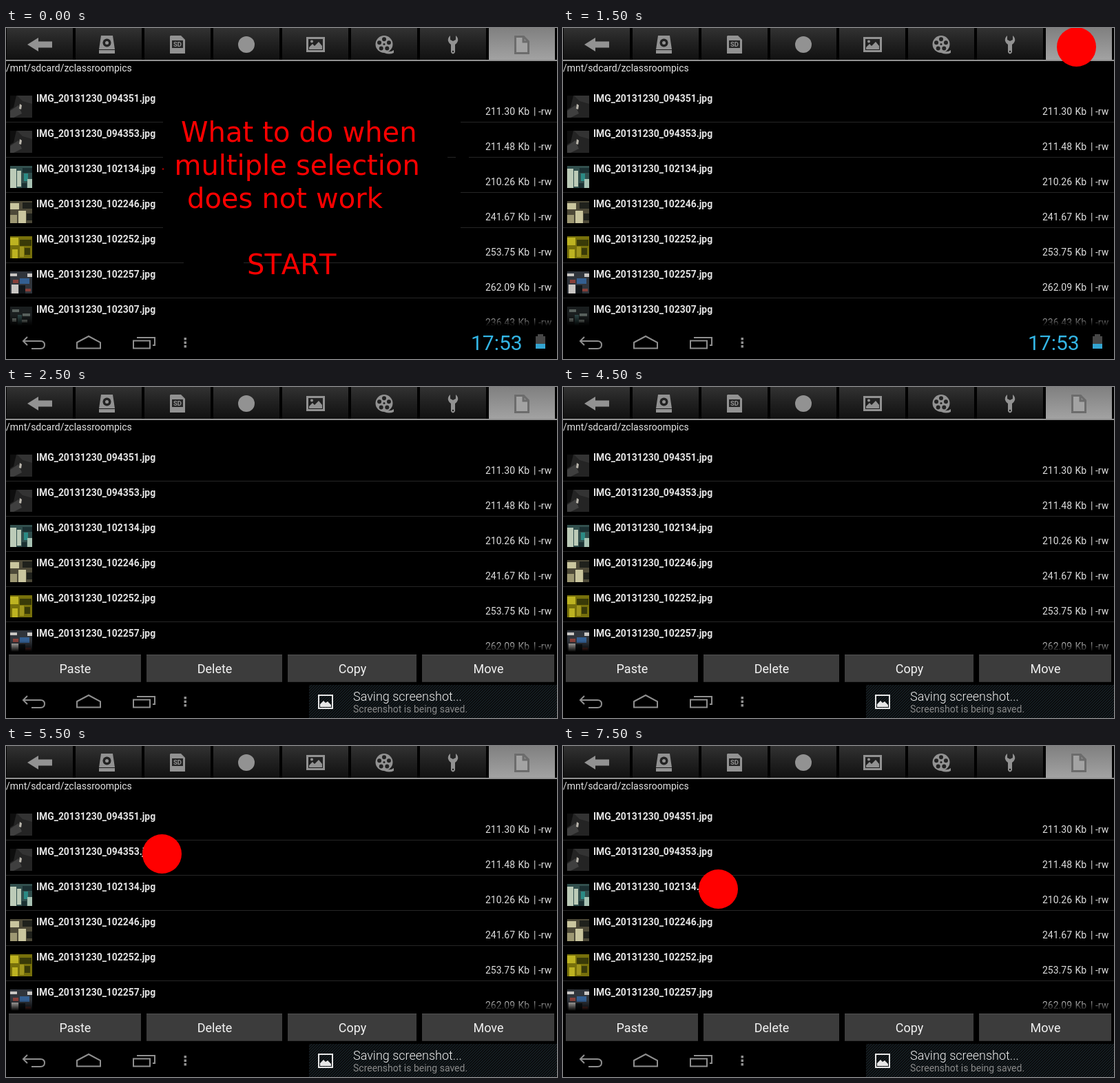
These frames come from a looping animation (800x480 px, 8 s). An HTML page:

```html
<!DOCTYPE html>
<html lang="en">
<head>
<meta charset="utf-8">
<title>Multiple selection</title>
<style>
  html, body { margin: 0; width: 100%; height: 100%; overflow: hidden; background: #000; }
  svg { display: block; width: 800px; height: 480px; font: 14px Roboto, sans-serif; }
  .name { font-size: 13.9px; font-weight: 700; fill: #e4e4e4; }
  .size { fill: #dedede; word-spacing: 1px; }
  .title { font: 40px "DejaVu Sans", sans-serif; font-kerning: none; fill: #f00; word-spacing: .4px; }
  .button { font-size: 18px; fill: #f2f2f2; text-anchor: middle; }
</style>
</head>
<body>
<svg viewBox="0 0 800 480">
  <defs>
    <linearGradient id="tab" x2="0" y2="1">
      <stop stop-color="#323232"/><stop offset=".5" stop-color="#202020"/><stop offset="1" stop-color="#111"/>
    </linearGradient>
    <linearGradient id="active" x2="0" y2="1">
      <stop stop-color="#808080"/><stop offset="1" stop-color="#a2a2a2"/>
    </linearGradient>
    <linearGradient id="fade" x2="0" y2="1">
      <stop stop-opacity="0"/><stop offset="1"/>
    </linearGradient>
    <pattern id="hatch" width="4" height="4" patternUnits="userSpaceOnUse">
      <rect width="4" height="4" fill="#0b0d0e"/>
      <path d="M-1 1L1 -1M0 4L4 0M3 5L5 3" stroke="#20303a" stroke-width=".8"/>
    </pattern>
  </defs>
  <rect width="800" height="480"/>

  <g id="tabs"></g>
  <rect y="46" width="800" height="2" fill="#929292"/>
  <g fill="#929292">
    <path d="M31 24L47 14V19.500H67V28.500H47V34Z"/>
    <path d="M138 11H155L158 31H135ZM135 32H158V37H135Z"/>
    <circle cx="146.500" cy="21.500" r="6" fill="#222"/>
    <circle cx="146.500" cy="21.500" r="2.500"/>
    <path d="M239 11H254L260 17V37H238V12Z"/>
    <rect x="241" y="18" width="16" height="11" fill="#252525"/>
    <text x="249" y="27" font-size="9.500" font-weight="700" text-anchor="middle">SD</text>
    <circle cx="349" cy="24" r="12"/>
    <path fill-rule="evenodd" d="M436 13H463V35H436ZM439 16V32H460V16Z"/>
    <path d="M440 31V28L445 23L448 26L454 20L459 26V31Z"/>
    <circle cx="444" cy="19.500" r="2"/>
    <circle cx="549" cy="23.500" r="12.500"/>
    <path d="M549 33Q558 36 563 32V36Q557 39 549 36Z"/>
    <g id="reel" fill="#222"></g>
    <path d="M645 11V17L649 19L653 17V11Q657 14 656 19Q655 22 652 24V35Q649 40 646 35V24Q643 22 642 19Q641 14 645 11Z"/>
    <circle cx="649" cy="34" r="1.300" fill="#222"/>
  </g>
  <path d="M739.500 12.500H751.500L758.500 19.500V36.500H739.500ZM751 13V20H758" fill="#a3a3a3" stroke="#6c6c6c" stroke-width="3"/>

  <text y="63" fill="#e4e4e4">/mnt/sdcard/zclassroompics</text>
  <g id="rows"></g>
  <rect y="416" width="800" height="16" fill="url(#fade)"/>

  <rect y="432" width="800" height="48"/>
  <g fill="none" stroke="#8f8f8f" stroke-width="2">
    <path d="M31 448L25 454L31 460M25 454H50Q56 454 56 459.500T50 465H37"/>
    <path d="M103 456L120 447L137 456V464.500H103Z"/>
    <path d="M185 453.500H209V464.500H185ZM190 449H216V460H213"/>
  </g>
  <path d="M258.500 449h3.500v3.500h-3.500zM258.500 454.500h3.500v3.500h-3.500zM258.500 460h3.500v3.500h-3.500z" fill="#8f8f8f"/>
  <text x="675" y="467" font-size="30" fill="#33b5e5">17:53</text>
  <path d="M772 444H780V447H783V465H769V447H772Z" fill="#474747"/>
  <rect x="769" y="458" width="14" height="7" fill="#33a5d2"/>

  <g id="title">
    <path d="M228 136.500H660M228 187.500H641M653 187.500H672M228 238.500H660M228 289.500H660M258 340.500H345" stroke="#000" stroke-width="3"/>
    <circle cx="228" cy="204.500" r="1.300" fill="#b00000"/>
    <g class="title">
      <text x="254" y="165">What to do when</text>
      <text x="244.500" y="213">multiple selection</text>
      <text x="263" y="261">does not work</text>
      <text x="350" y="357">START</text>
    </g>
  </g>

  <g id="panel">
    <rect y="368" width="800" height="16" fill="url(#fade)"/>
    <rect y="384" width="800" height="48"/>
    <g id="buttons"></g>
    <rect x="440" y="432" width="360" height="48" fill="url(#hatch)"/>
    <path fill="#e6e6e6" fill-rule="evenodd" d="M453 446H475V467H453ZM455 448V465H473V448Z"/>
    <path fill="#e6e6e6" d="M456 464V460L461 455L464 458L467 456L472 461V464Z"/>
    <text x="504" y="455" font-size="18" font-weight="300" fill="#f0f0f0">Saving screenshot...</text>
    <text x="504" y="472" fill="#8a8a8a">Screenshot is being saved.</text>
  </g>
  <circle id="dot" r="28.500" fill="#f00"/>
</svg>
<script>
const $ = id => document.getElementById(id);

const dark = [
  ["#242424", "M0 0H32V32H0Z"], ["#333", "M10 0H32V12L18 8Z"],
  ["#0e0e0e", "M0 0H9L5 17L0 20Z"], ["#3f3f3f", "M0 22L12 14L17 26L5 32H0Z"],
  ["#b9b5ac", "M14 12L17 14L16 20L13 19Z"]
];
const photos = [
  dark, dark,
  [["#32504e", "M0 0H32V32H0Z"], ["#bccbb8", "M0 4H9V32H0ZM10 7H16V30H10Z"],
   ["#1b3032", "M18 3H32V10H18ZM17 25H24V32H17Z"], ["#2b8a84", "M20 11H26V22H20Z"], ["#a8c3b4", "M25 19H32V32H25Z"]],
  [["#4d4938", "M0 0H32V32H0Z"], ["#c9c59e", "M0 3H13V12H0ZM12 14H23V32H12Z"],
   ["#1f211c", "M18 2H32V11H18ZM24 18H32V28H24Z"], ["#9d9772", "M0 20H10V32H0Z"]],
  [["#77700b", "M0 0H32V32H0Z"], ["#bdb321", "M0 2H12V13H0ZM3 19H11V32H3Z"],
   ["#393a08", "M14 5H31V14H14ZM21 17H29V27H21Z"], ["#a0961d", "M14 15H20V30H14Z"]],
  [["#30353c", "M0 0H32V32H0Z"], ["#c9c6c3", "M0 3H10V7H0ZM2 19H12V32H2ZM25 3H32V8H25Z"],
   ["#873f39", "M4 12H12V17H4ZM22 25H30V29H22Z"], ["#345f91", "M14 10H28V18H14Z"], ["#11161a", "M13 20H22V32H13Z"]],
  [["#1a1e1f", "M0 0H32V32H0Z"], ["#59625e", "M3 4H13V8H3ZM18 10H29V14H18Z"],
   ["#7d8580", "M3 17H9V22H3ZM17 19H25V23H17Z"], ["#2d4545", "M11 12H17V27H11Z"]]
];
const files = [
  ["094351", "211.30"], ["094353", "211.48"], ["102134", "210.26"], ["102246", "241.67"],
  ["102252", "253.75"], ["102257", "262.09"], ["102307", "236.43"]
];

$("tabs").innerHTML = Array.from({ length: 8 }, (_, i) =>
  `<rect x="${i * 100 + 1}" width="96" height="46" fill="url(#${i === 7 ? "active" : "tab"})"/>`
).join("");

$("reel").innerHTML = Array.from({ length: 5 }, (_, i) => {
  const a = (i * 72 - 90) * Math.PI / 180;
  return `<circle cx="${549 + 7.3 * Math.cos(a)}" cy="${23.5 + 7.3 * Math.sin(a)}" r="3"/>`;
}).join("") + '<circle cx="549" cy="23.500" r="1.500"/>';

$("rows").innerHTML = files.map(([time, size], i) => `
  <g transform="translate(0 ${i * 51})">
    <g transform="translate(6 98)">${photos[i].map(([fill, d]) => `<path fill="${fill}" d="${d}"/>`).join("")}</g>
    <text class="name" x="44" y="107">IMG_20131230_${time}.jpg</text>
    <g class="size"><text x="696" y="126">${size} Kb</text>
    <text x="766" y="126">|</text><text x="773" y="126">-rw</text></g>
    <rect y="136" width="800" height="1" fill="#262626"/>
  </g>`).join("");

const buttons = [["Paste", 4, 196], ["Delete", 204, 401], ["Copy", 409, 596], ["Move", 604, 796]];
$("buttons").innerHTML = buttons.map(([label, l, r]) => `
  <rect x="${l}" y="388" width="${r - l}" height="40" fill="#3c3c3c"/>
  <path d="M${l} 388.500H${r}" stroke="#525252"/>
  <path d="M${l} 427.500H${r}" stroke="#303030"/>
  <text class="button" x="${(l + r) / 2 + .5}" y="415">${label}</text>`).join("");

// start, end, x, y of each tap
const taps = [
  [1500, 2500, 745.5, 27.5],
  [3500, 4500, 231.5, 105.5],
  [5500, 6500, 226.5, 156.5],
  [7500, 8000, 225.5, 207.5]
];
const show = (id, on) => { $(id).style.display = on ? "" : "none"; };

function draw(now) {
  const t = now % 8000;
  show("title", t < 500);
  show("panel", t >= 2500);
  const tap = taps.find(([from, to]) => t >= from && t < to);
  show("dot", tap);
  if (tap) $("dot").setAttribute("transform", `translate(${tap[2]} ${tap[3]})`);
}

const start = performance.now();
function tick() {
  draw(performance.now() - start);
  requestAnimationFrame(tick);
}
tick();
</script>
</body>
</html>
```
